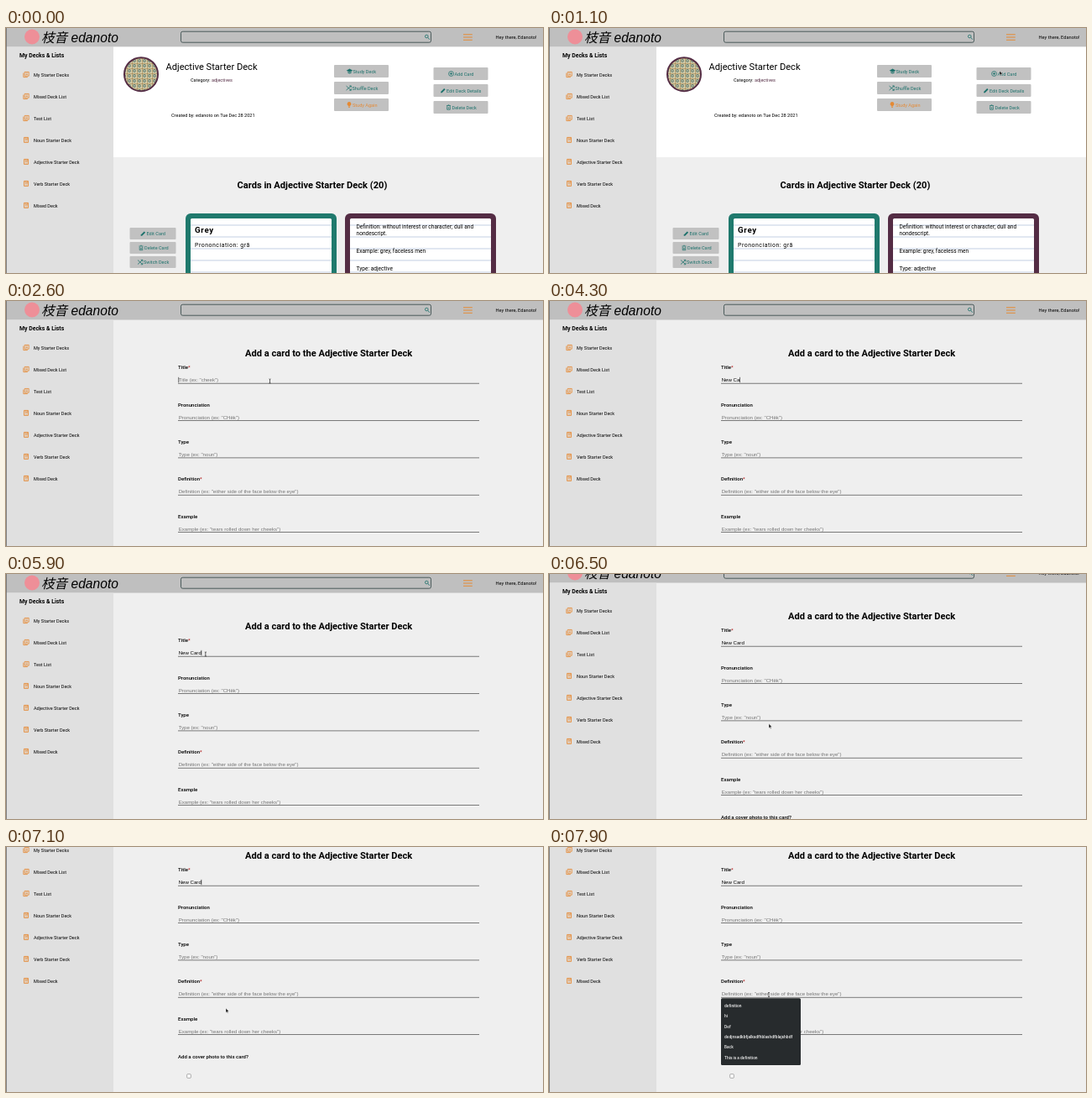
These frames come from a looping animation (640 px wide and 292 px high, 8000 ms). An HTML page:

```html
<!DOCTYPE html>
<html lang="en">
<head>
<meta charset="utf-8">
<title>Flashcard form</title>
<style>
html, body { margin: 0; width: 100%; height: 100%; overflow: hidden; background: #efefef; }
svg { display: block; width: 640px; height: 292px; }
text { font-family: Roboto, Arial, sans-serif; white-space: pre; }
.sans { font-family: "Liberation Sans", Arial, sans-serif; }
.logo { font-family: "Liberation Sans", "Noto Sans CJK JP", "Noto Sans CJK", sans-serif; font-style: italic; }
.menu { font-family: Inter, sans-serif; }
</style>
</head>
<body>
<svg id="stage" viewBox="0 0 640 292" xmlns="http://www.w3.org/2000/svg"></svg>
<script>
const LOOP = 8000, STEP = 100;
const TEAL = '#1c716b', ORANGE = '#e58a35', PLUM = '#542c44';

const rect = (x, y, w, h, fill, more = '') =>
  `<rect x="${x}" y="${y}" width="${w}" height="${h}" fill="${fill}" ${more}/>`;
// y is the middle of the line of text
const text = (x, y, str, size = 5.55, more = '') =>
  `<text x="${x}" y="${y + size * 0.355}" font-size="${size}" ${more}>${str}</text>`;
const stroke = (d, color, width = 0.8, more = '') =>
  `<path d="${d}" fill="none" stroke="${color}" stroke-width="${width}" ${more}/>`;

// Icons are drawn around 0,0 in a box of about 7 px
const icons = {
  cap: c => `<path d="M-3.8-.8L0-2.9 3.8-.8 0 1.3zM-2.2.8V2L0 3.1 2.2 2V.8L0 2z" fill="${c}"/>`,
  shuffle: c => stroke('M-3-2.4L2.6 2.6M.8 2.8H2.8V.8M-3 2.6L2.6-2.4M.8-2.6H2.8V-.6', c),
  bulb: c => `<path d="M0-3.4A2.4 2.4 0 0 0-1.2 1.1V2H1.2V1.1A2.4 2.4 0 0 0 0-3.4zM-1 2.5H1V3.3H-1z" fill="${c}"/>`,
  plus: c => `<circle r="2.9" fill="none" stroke="${c}" stroke-width=".8"/>` + stroke('M-1.7 0H1.7M0-1.7V1.7', c),
  pencil: c => `<path d="M-2.8 2.8V1.4L1.2-2.6 2.6-1.2-1.4 2.8z" fill="${c}"/>`,
  trash: c => stroke('M-1.8-1.3V2.7H1.8V-1.3M-2.5-2H2.5M-.8-2.7H.8M-.8 0L.8 1.6M.8 0L-.8 1.6', c, 0.75),
  list: c => stroke('M-1.8-3H3.2V1.8H-1.8zM-3.2-1.8V3.2H1.8M-.4-1.4H1.8M-.4.2H1.8', c, 0.85),
  book: c => stroke('M-2.5-3H2.5V3H-2.5zM-.8-3V0L.2-.8 1.2 0V-3', c, 0.85) + stroke('M-1.5 1.6H1.5', c, 0.6)
};
const icon = (name, x, y, color) => `<g transform="translate(${x} ${y})">${icons[name](color)}</g>`;

const button = (x, y, w, h, name, iconX, label, color = TEAL) =>
  rect(x, y, w, h, '#c1c1c1', 'rx="1"') + icon(name, iconX, y + h / 2, color) +
  text(iconX + 4, y + h / 2 + 0.2, label, 5.55, `fill="${color}"`);

function header() {
  return rect(0, 0, 640, 22.5, '#bfbfbf') +
    '<circle cx="31" cy="10.5" r="9" fill="#ee8f98"/>' +
    text(42, 11, '枝音 edanoto', 15.6, 'class="logo"') +
    rect(208.5, 4.2, 298, 13, 'none', 'rx="2" stroke="#3d4f4e" stroke-width=".9"') +
    `<circle cx="501.3" cy="10" r="1.8" fill="none" stroke="${TEAL}" stroke-width=".8"/>` +
    stroke('M502.6 11.3L505 13.7', TEAL, 0.9) +
    stroke('M545 7.8H555.8M545 11H555.8M545 14.2H555.8', ORANGE, 1.1) +
    text(583.5, 10.5, 'Hey there, Edanoto!', 5.7);
}

function sidebar() {
  const items = ['My Starter Decks', 'Mixed Deck List', 'Test List', 'Noun Starter Deck',
    'Adjective Starter Deck', 'Verb Starter Deck', 'Mixed Deck'];
  return rect(0, 22.5, 128, 400, '#e0e0e0') +
    text(16, 32.5, 'My Decks &amp; Lists', 6.9, 'font-weight="700"') +
    items.map((label, i) => {
      const y = 56 + 26 * i;
      return icon(i < 3 ? 'list' : 'book', 24, y - 0.6, ORANGE) + text(33, y, label, 5.55);
    }).join('');
}

function card(x, color, body) {
  let lines = '';
  for (let y = 235; y < 292; y += 14) lines += `M${x + 6} ${y}h168`;
  return rect(x, 221, 180, 90, color, 'rx="6"') + rect(x + 6, 227, 168, 80, '#fff', 'rx="1.5"') +
    stroke(lines, '#b4c3dc', 0.8) + body;
}

function deckPage() {
  const bold = 'font-weight="700"';
  return `<defs><pattern id="tiles" width="6" height="6" patternUnits="userSpaceOnUse">
      <rect width="6" height="6" fill="#d8cfaa"/><circle cx="3" cy="3" r="1.9" fill="#657f72"/>
      <circle cx="3" cy="3" r=".8" fill="#e8dfbc"/><path d="M0 0H6M0 0V6" stroke="#94733f" stroke-width="1"/>
    </pattern></defs>` +
    rect(128, 22.5, 512, 131.5, '#fff') +
    `<circle cx="161" cy="55.2" r="20" fill="url(#tiles)" stroke="${PLUM}" stroke-width="2"/>` +
    text(190.5, 46.5, 'Adjective Starter Deck', 11.1) +
    text(220, 62, `Category: <tspan fill="${PLUM}">adjectives</tspan>`, 5.55) +
    text(197, 104.5, 'Created by: edanoto on Tue Dec 28 2021', 5.55) +
    button(391, 44, 65, 15, 'cap', 409.5, 'Study Deck') +
    button(391, 64, 65, 15, 'shuffle', 408.5, 'Shuffle Deck') +
    button(391, 84, 65, 15, 'bulb', 409, 'Study Again', ORANGE) +
    button(509.5, 47, 65, 15, 'plus', 530.5, 'Add Card') +
    button(509.5, 67, 65, 15, 'pencil', 521, 'Edit Deck Details') +
    button(509.5, 87, 65, 15, 'trash', 527.5, 'Delete Deck') +
    text(275.5, 187, 'Cards in Adjective Starter Deck (20)', 11.1, bold) +
    button(147.5, 238, 55, 14, 'pencil', 163.5, 'Edit Card') +
    button(147.5, 255, 55, 14, 'trash', 161, 'Delete Card') +
    button(147.5, 272, 55, 14, 'shuffle', 160, 'Switch Deck') +
    card(214, '#1f796d',
      text(225, 240.5, 'Grey', 9.7, bold + ' letter-spacing=".7"') +
      text(225, 258.5, 'Prononciation: grā', 6.95, 'letter-spacing=".52"')) +
    card(404, PLUM,
      ['Definition: without interest or character; dull and', 'nondescript.',
        'Example: grey, faceless men', 'Type: adjective']
        .map((line, i) => text(417.5, [237, 245, 266, 287][i], line, 6.58)).join(''));
}

const FIELD_TOP = 94, PITCH = 44.35;
const fields = [
  ['Title', '"cheek"', true], ['Pronunciation', '"CHēk"'], ['Type', '"noun"'],
  ['Definition', '"either side of the face below the eye"', true],
  ['Example', '"tears rolled down her cheeks"']
];

function formPage() {
  const label = 'font-weight="500"';
  return text(285, 62, 'Add a card to the Adjective Starter Deck', 11.1, 'font-weight="700"') +
    fields.map(([name, hint, required], i) => {
      const y = FIELD_TOP + PITCH * i;
      const star = required ? '<tspan fill="#b52a2a">*</tspan>' : '';
      return text(205, y - 14.7, name + star, 6.05, label) +
        text(205.7, y, `${name} (ex: ${hint})`, 6.1, `class="sans" fill="#757575" id="hint${i}"`) +
        rect(205, y + 3.8, 359, 0.8, '#5c5c5c');
    }).join('') +
    text(205.7, FIELD_TOP, '', 6.1, 'class="sans" id="typed"') +
    text(205, 301.5, 'Add a cover photo to this card?', 6.05, label) +
    rect(215.7, 322.7, 4.6, 4.6, '#fff', 'rx=".8" stroke="#777" stroke-width=".6"') +
    rect(0, 0, 0.6, 6.4, '#111', 'id="caret"');
}

function suggestions() {
  const items = ['definition', 'hi', 'Def', 'dedjnsadkbfjalksdfhblashdfblajshbdf', 'Back', 'This is a definition'];
  return rect(205, 180.3, 95, 79.7, '#272b2d', 'rx="1.5"') +
    items.map((s, i) => text(209, 189.3 + 12.4 * i, s, 4.5, 'class="menu" fill="#f2f2f2" font-weight="600"')).join('');
}

const stage = document.getElementById('stage');
stage.innerHTML = rect(0, 0, 640, 292, '#efefef') +
  `<g id="page">${header()}${sidebar()}<g id="deck">${deckPage()}</g><g id="form">${formPage()}</g></g>
  <g id="menu">${suggestions()}</g>` +
  rect(0, 0, 0.8, 292, '#6b6b6b') +
  `<g id="pointer">
    <path id="arrow" d="M0 0V5.2L1.2 4.1 2 5.9 2.9 5.5 2.1 3.8H3.7z" fill="#111" stroke="#fff" stroke-width=".4"/>
    <path id="beam" d="M-1-2.6Q0-2.6 0-2V2Q0 2.6-1 2.6M1-2.6Q0-2.6 0-2M0 2Q0 2.6 1 2.6" fill="none" stroke="#222" stroke-width=".7"/>
  </g>`;

const el = id => document.getElementById(id);
const show = (id, on) => el(id).setAttribute('display', on ? 'inline' : 'none');
const move = (id, x, y) => el(id).setAttribute('transform', `translate(${x} ${y})`);

// Keys are [time, ...values]
function track(keys, t, ease = u => u) {
  const next = keys.findIndex(k => k[0] > t);
  if (next === 0) return keys[0].slice(1);
  if (next < 0) return keys[keys.length - 1].slice(1);
  const a = keys[next - 1], b = keys[next];
  const u = ease((t - a[0]) / (b[0] - a[0]));
  return a.slice(1).map((v, i) => v + (b[i + 1] - v) * u);
}
const smooth = u => u * u * (3 - 2 * u);

const pointerKeys = [[0, 470, 300], [900, 537, 51], [1500, 537, 51], [2400, 314.5, 95.5], [4800, 314.5, 95.5],
  [5700, 237.8, 95.5], [5900, 237.8, 95.5], [6400, 262, 178.5], [6600, 262, 178.5], [7000, 262, 192.2],
  [7100, 262, 192.2], [7400, 262, 176]];
const scrollKeys = [[6400, 0], [6500, 12], [6700, 34], [6900, 49], [7000, 52]];
const keyTimes = [3100, 3300, 3500, 3700, 4000, 4200, 4400, 4600];
const OPEN_FORM = 1500, FOCUS_TITLE = 2500, FOCUS_DEFINITION = 7400;

function render(t) {
  const onForm = t >= OPEN_FORM;
  const [scroll] = track(scrollKeys, t);
  const [x, y] = track(pointerKeys, t, smooth);
  const typed = 'New Card'.slice(0, keyTimes.filter(k => k <= t).length);

  show('deck', !onForm);
  show('form', onForm);
  move('page', 0, -scroll);

  el('typed').textContent = typed;
  show('hint0', !typed);
  show('menu', t >= FOCUS_DEFINITION);

  const inDefinition = t >= FOCUS_DEFINITION;
  const typing = t >= FOCUS_TITLE && t < 4900;
  const blink = (t + 300) % 1000 < 500;
  show('caret', inDefinition ? t < 7900 : typing || (t >= FOCUS_TITLE && blink));
  const caretX = 205.5 + (typed && !inDefinition ? el('typed').getComputedTextLength() : 0);
  move('caret', caretX, FIELD_TOP - 3.2 + (inDefinition ? 3 * PITCH : 0));

  const overField = onForm && x > 205 && x < 564 &&
    fields.some((_, i) => Math.abs(y + scroll - FIELD_TOP - PITCH * i) < 5.5);
  show('pointer', t >= 100 && !(t >= keyTimes[0] && t < 4900));
  show('arrow', !overField);
  show('beam', overField);
  move('pointer', x, y);
}

const start = performance.now();
function tick() {
  const t = (performance.now() - start) % LOOP;
  render(Math.floor(t / STEP) * STEP);
  requestAnimationFrame(tick);
}
tick();
</script>
</body>
</html>
```
